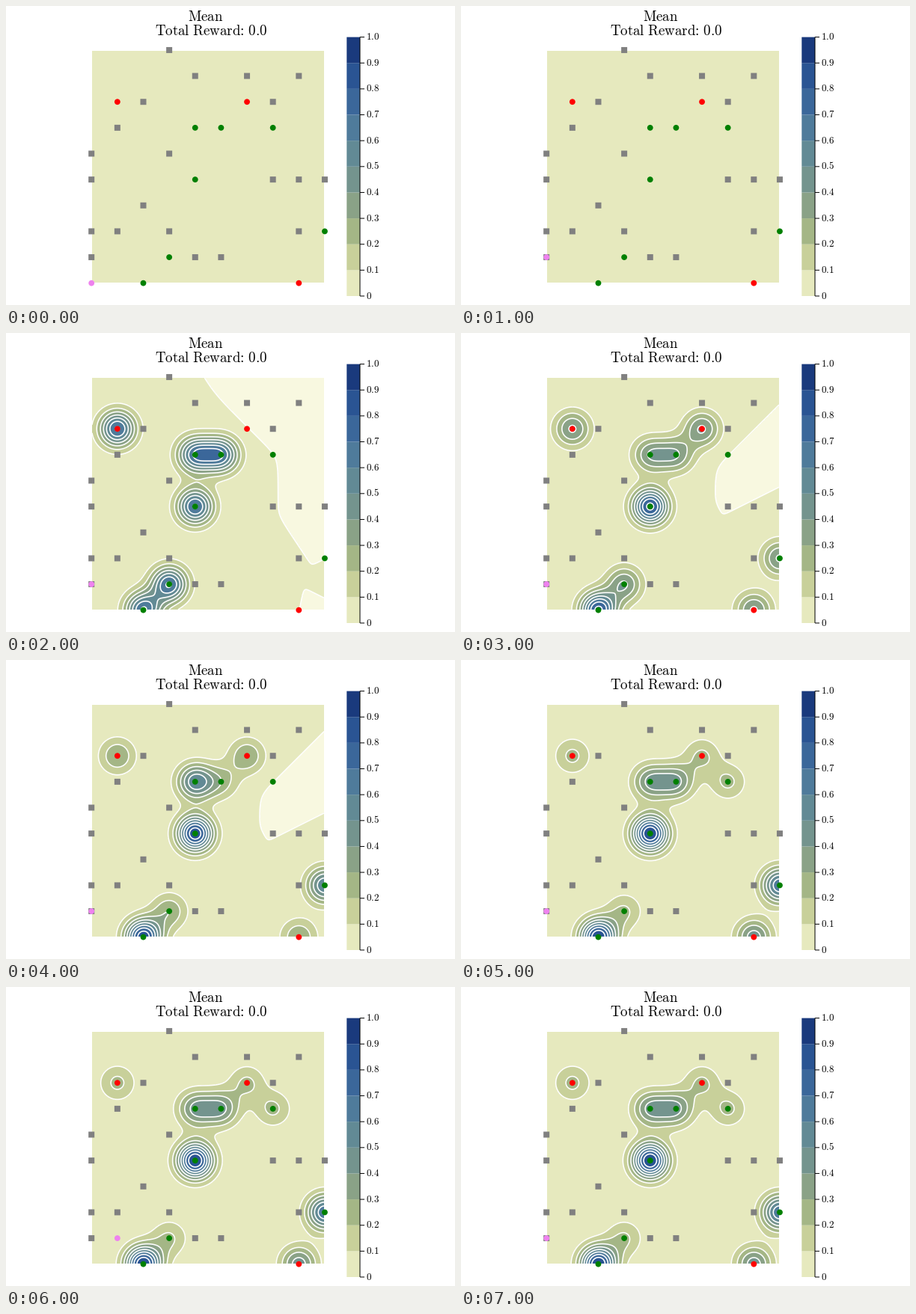
A matplotlib script that plays this animation: 600x400 px, repeating every 8 s.

```python
import numpy as np
import matplotlib.pyplot as plt
from matplotlib.animation import FuncAnimation
from matplotlib.patches import Circle, Rectangle

W, H, DPI = 600, 400, 100
PX = 72 / DPI                       # points per pixel
X0, Y0, CELL = 114.2, 370.7, 34.64  # cell (0, 0) and grid spacing
LEFT, TOP, SIDE = 115, 60, 310

BANDS = ["#e6e9be", "#c8d09a", "#a4b686", "#8aa287", "#74948e",
         "#628a95", "#4f7b9b", "#3b679a", "#2a5493", "#1a3a7d"]
BELOW = "#f8f8e0"
LEVELS = np.linspace(0, 1, 11)

GRID = """
...#......
....#.#.#.
..#....#..
.#........
#..#......
#......###
..#.......
##.#....#.
#...##....
..........
""".split()

# Sensor reading of each beacon, one digit per round
BAD = {(1, 7): "1000", (6, 7): "0100", (8, 0): "0101"}
GOOD = {(4, 6): "1010", (5, 6): "1001", (7, 6): "0001", (4, 4): "1111",
        (9, 2): "0111", (3, 1): "1000", (2, 0): "1111"}
BEACONS = BAD | GOOD
ROUNDS = 4
NOISE = 0.41  # variance of a single reading

plt.rcParams["mathtext.fontset"] = "cm"
fig = plt.figure(figsize=(W / DPI, H / DPI), dpi=DPI, facecolor="white")
ax = fig.add_axes([0, 0, 1, 1])
ax.set_xlim(0, W)
ax.set_ylim(H, 0)
ax.set_autoscale_on(False)
ax.axis("off")


def place(col, row):
    return X0 + CELL * col, Y0 - CELL * row


def dot(cell, color, z=5):
    return ax.add_patch(Circle(place(*cell), 3.9, facecolor=color,
                               linewidth=0, zorder=z))


def rock(cell, size=8):
    x, y = place(*cell)
    ax.add_patch(Rectangle((x - size / 2, y - size / 2), size, size,
                           facecolor="#808080", linewidth=0, snap=False,
                           zorder=4))


def label(x, y, words, px, ha="left"):
    text = r"\ ".join(rf"\text{{{w}}}" for w in words.split())
    ax.text(x, y, f"${text}$", fontsize=px * PX, ha=ha, va="baseline")


def kernel(ax_, ay, bx, by):
    return np.exp(-2 * ((ax_ - bx) ** 2 + (ay - by) ** 2))


def posterior_mean(cols, rows, n):
    """Gaussian process mean after n rounds of readings."""
    bx, by = np.array(list(BEACONS), float).T
    seen = [r[:n].count("1") / n for r in BEACONS.values()]
    cov = kernel(bx[:, None], by[:, None], bx, by)
    weights = np.linalg.solve(cov + NOISE / n * np.eye(len(bx)), seen)
    return sum(w * kernel(cols, rows, x, y)
               for w, x, y in zip(weights, bx, by))


def draw_mean(n):
    gx, gy = np.meshgrid(np.linspace(LEFT, LEFT + SIDE, 249),
                         np.linspace(TOP, TOP + SIDE, 249))
    mean = posterior_mean((gx - X0) / CELL, (Y0 - gy) / CELL, n)
    return [
        ax.contourf(gx, gy, mean, [-1, *LEVELS], colors=[BELOW] + BANDS,
                    zorder=2),
        ax.contour(gx, gy, mean, LEVELS[:-1], colors="white",
                   linewidths=1.6 * PX, zorder=3),
    ]


def draw_colorbar(left=455.3, right=473, top=41.6, bottom=388):
    step = (bottom - top) / len(BANDS)
    line = dict(color="black", lw=PX, snap=False, solid_capstyle="butt")
    for k, color in enumerate(BANDS):
        ax.add_patch(Rectangle((left, bottom - (k + 1) * step), right - left,
                               step, facecolor=color, linewidth=0,
                               snap=False))
    ax.plot([right, right], [top, bottom], **line)
    for k, level in enumerate(LEVELS):
        y = bottom - k * step
        ax.plot([right, right + 6], [y, y], **line)
        label(right + 8, y + 3.6, f"{level:.1f}" if k else "0", 13)


ax.add_patch(Rectangle((LEFT, TOP), SIDE, SIDE, facecolor=BANDS[0],
                       linewidth=0, zorder=1))
means = [draw_mean(n) for n in range(1, ROUNDS + 1)]

for row, line in enumerate(reversed(GRID)):
    for col, mark in enumerate(line):
        if mark == "#":
            rock((col, row))
for cell in BAD:
    dot(cell, "#ff0000")
for cell in GOOD:
    dot(cell, "#008000")
robot = dot((0, 0), "#ee82ee", 6)

label(266.5, 20, "Mean", 18.9, "center")
label(274, 39.4, "Total Reward: 0.0", 18.9, "center")
draw_colorbar()


def update(i):
    # Step up, sense for some rounds, then look right and come back
    robot.center = place(int(i == 6), int(i > 0))
    rounds = min(i - 1, ROUNDS)
    for n, parts in enumerate(means, 1):
        for part in parts:
            part.set_visible(n == rounds)
    return []


anim = FuncAnimation(fig, update, frames=8, interval=1000, repeat=True,
                     repeat_delay=0, blit=False)
plt.show()
```
